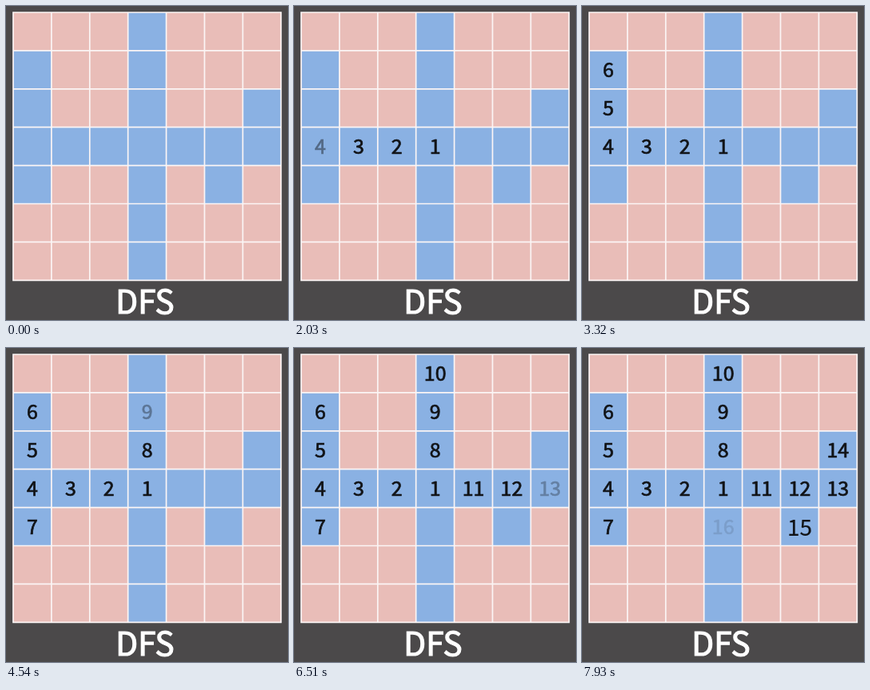
Write an HTML page that moves like this. It is 353x393 px and loops after 8000 ms.

```html
<!DOCTYPE html>
<html lang="en">
<head>
<meta charset="utf-8">
<title>DFS</title>
<style>
  html, body { margin: 0; width: 100%; height: 100%; overflow: hidden; background: #4b494a; }
  svg { display: block; width: 100%; height: 100%; }
  text {
    font-family: "Noto Sans CJK JP", "Noto Sans CJK SC", "Noto Sans CJK", "Noto Sans", sans-serif;
    font-weight: 400;
    text-anchor: middle;
  }
  .num { font-size: 25px; fill: #111316; stroke: #111316; stroke-width: .7; }
  .num.big { font-size: 28px; stroke-width: .2; }
  .title { font-size: 40.5px; fill: #fff; stroke: #fff; stroke-width: 1.2; }
</style>
</head>
<body>
<svg id="stage" viewBox="0 0 353 393">
  <rect width="353" height="393" fill="#4b494a"/>
  <g id="cells"></g>
  <path id="lines" fill="none" stroke="#fbf5f5" stroke-width="1.7" stroke-linecap="square"/>
  <g id="numbers"></g>
  <text class="title" x="174" y="384.6">DFS</text>
</svg>
<script>
const LOOP = 8000, FADE = 250;
const LEFT = 9, TOP = 8, CELL = 47.9;
const grid = [
  "...#...",
  "#..#...",
  "#..#..#",
  "#######",
  "#..#.#.",
  "...#...",
  "...#..."
];
const SIZE = grid.length;

function add(parent, tag, attrs, text = "") {
  const el = document.createElementNS("http://www.w3.org/2000/svg", tag);
  for (const key in attrs) el.setAttribute(key, attrs[key]);
  el.textContent = text;
  return document.getElementById(parent).appendChild(el);
}

let lines = "";
for (let i = 0; i <= SIZE; i++) {
  const x = LEFT + i * CELL, y = TOP + i * CELL;
  lines += `M${x} ${TOP}v${SIZE * CELL}M${LEFT} ${y}h${SIZE * CELL}`;
}
document.getElementById("lines").setAttribute("d", lines);

grid.forEach((row, r) => [...row].forEach((c, i) => add("cells", "rect", {
  x: LEFT + i * CELL, y: TOP + r * CELL, width: CELL, height: CELL,
  fill: c === "#" ? "#8ab1e3" : "#e9bdb8"
})));

// Depth-first order: left, up, right, down
const order = [], seen = new Set();
function visit(r, c) {
  const key = r * SIZE + c;
  if (grid[r]?.[c] !== "#" || seen.has(key)) return;
  seen.add(key);
  order.push([r, c]);
  visit(r, c - 1);
  visit(r - 1, c);
  visit(r, c + 1);
  visit(r + 1, c);
}
visit(3, 3);

const numbers = order.map(([r, c], n) => {
  const big = n === 14;
  return {
    // The pace quickens slightly
    start: 376 + 517 * n - 1.02 * n * n,
    el: add("numbers", "text", {
      class: big ? "num big" : "num",
      x: LEFT + (c + .5) * CELL,
      y: TOP + (r + .5) * CELL + (big ? 11 : 9),
      opacity: 0
    }, n + 1)
  };
});

function draw(t) {
  for (const { start, el } of numbers) {
    el.setAttribute("opacity", Math.min(1, Math.max(0, (t - start) / FADE)));
  }
}

const begin = performance.now();
function tick() {
  draw((performance.now() - begin) % LOOP);
  requestAnimationFrame(tick);
}
tick();
</script>
</body>
</html>
```
